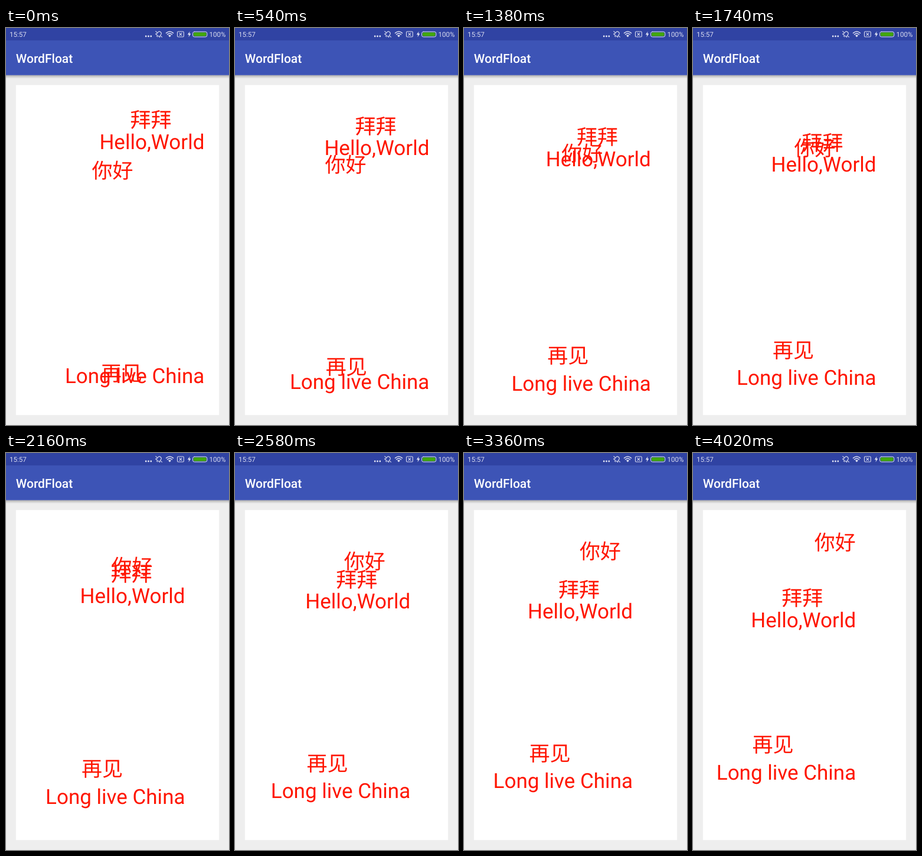
Recreate the animation shown at these times as an HTML page. Size 378x672 px, loop 4.08 s.

```html
<!DOCTYPE html>
<html lang="en">
<head>
<meta charset="utf-8">
<title>Drifting labels</title>
<style>
  html, body { margin: 0; width: 100%; height: 100%; overflow: hidden; background: #eee; }
  svg { display: block; width: 378px; height: 672px; }
  text { font-family: Roboto, "Noto Sans CJK SC", "Noto Sans CJK", sans-serif; text-rendering: geometricPrecision; }
  .status text { font-size: 11.6px; fill: #d9dcf0; }
  .icons { fill: none; stroke: #d9dcf0; stroke-width: 1.1; stroke-linecap: round; stroke-linejoin: round; }
  .solid { fill: #e4e7f5; stroke: none; }
  .title { font-size: 21px; font-weight: 500; fill: #fff; }
  #labels { font-size: 35px; fill: #ff1500; }
  #labels .cjk { font-family: "Noto Sans CJK SC", "Noto Sans CJK", sans-serif; }
</style>
</head>
<body>
<svg viewBox="0 0 378 672">
  <defs>
    <linearGradient id="shade" x2="0" y2="1">
      <stop stop-color="#000" stop-opacity=".3"/>
      <stop offset=".45" stop-color="#000" stop-opacity=".13"/>
      <stop offset="1" stop-color="#000" stop-opacity="0"/>
    </linearGradient>
  </defs>
  <rect width="378" height="672" fill="#eee"/>
  <rect x="16.8" y="96.6" width="344.4" height="558.6" fill="#fff"/>
  <rect y="79.8" width="378" height="6" fill="url(#shade)"/>
  <rect width="378" height="79.8" fill="#3d54b6"/>
  <rect width="378" height="21" fill="#3043a3"/>

  <g class="status">
    <text x="6" y="15.3">15:57</text>
    <text x="344.4" y="15.3">100%</text>
    <g class="icons">
      <g class="solid">
        <circle cx="237.2" cy="14" r="1.4"/>
        <circle cx="241.5" cy="14" r="1.4"/>
        <circle cx="245.8" cy="14" r="1.4"/>
      </g>
      <g transform="rotate(38 259 10.5)">
        <path d="M254.5 13.5H263.5L262.2 11.8V9A3.2 3.2 0 0 0 255.8 9V11.8ZM258 15.2H260"/>
      </g>
      <path d="M253.8 5.6L256.2 7.8M262.2 13.4L264.4 15.4"/>
      <path d="M271.5 8.6Q277.5 3.4 283.5 8.6M273.5 11Q277.5 7.5 281.5 11" stroke-width="1.5"/>
      <path class="solid" d="M275 12.7Q277.5 10.7 280 12.7L277.5 15.4Z"/>
      <rect x="290.5" y="6" width="10.8" height="9" rx="1.4"/>
      <path d="M294 8.6L297.8 12.4M297.8 8.6L294 12.4"/>
      <path class="solid" d="M311.6 5.8L307.8 11.3H310.3L309.5 15.4L313.4 9.6H310.9Z"/>
      <rect x="316.5" y="6.3" width="24.4" height="8.8" rx="3" stroke-width="1"/>
      <rect x="317.8" y="7.6" width="21.8" height="6.2" rx="1.8" fill="#43a80c" stroke="none"/>
    </g>
  </g>
  <text class="title" x="16.8" y="58.5">WordFloat</text>
  <g id="labels"></g>
</svg>
<script>
const LOOP = 4080, STEP = 60;
const DX = 0.7, DY = 1.05;   // travel per tick
const FLOOR_TICK = 20;       // when the lowest label bounces

const labels = [
  { text: '拜拜', x: 210.5, y: 168, dx: -1, dy: 1, cjk: true },
  { text: 'Hello,World', x: 336.4, y: 204.5, dx: -1, dy: 1 },
  { text: '你好', x: 145.6, y: 254.4, dx: 1, dy: -1, cjk: true },
  { text: '再见', x: 160.8, y: 596.6, dx: -1, dy: -1, cjk: true },
  { text: 'Long live China', x: 336.4, y: 600.9, dx: -1, dy: 1, bounces: true }
];

// [step, ticks elapsed]: the pace varies slightly
const pace = [[0, 0], [9, 10], [18, 20], [27, 34], [29, 37], [36, 47],
  [43, 56], [45, 58], [54, 70], [56, 72], [63, 81], [67, 86]];

const group = document.getElementById('labels');
for (const label of labels) {
  const node = document.createElementNS('http://www.w3.org/2000/svg', 'text');
  node.textContent = label.text;
  if (label.cjk) node.setAttribute('class', 'cjk');
  else node.setAttribute('text-anchor', 'end');
  label.node = group.appendChild(node);
}

function ticksAt(step) {
  const i = Math.max(1, pace.findIndex(([s]) => s >= step));
  const [s0, t0] = pace[i - 1], [s1, t1] = pace[i];
  return Math.round(t0 + (t1 - t0) * (step - s0) / (s1 - s0));
}

function render(ms) {
  const ticks = ticksAt(Math.floor((ms % LOOP) / STEP));
  for (const { node, x, y, dx, dy, bounces } of labels) {
    const rise = bounces ? FLOOR_TICK - Math.abs(ticks - FLOOR_TICK) : ticks;
    node.setAttribute('x', x + dx * DX * ticks);
    node.setAttribute('y', y + dy * DY * rise);
  }
}

const start = performance.now();
function loop() {
  render(performance.now() - start);
  requestAnimationFrame(loop);
}
loop();
</script>
</body>
</html>
```
